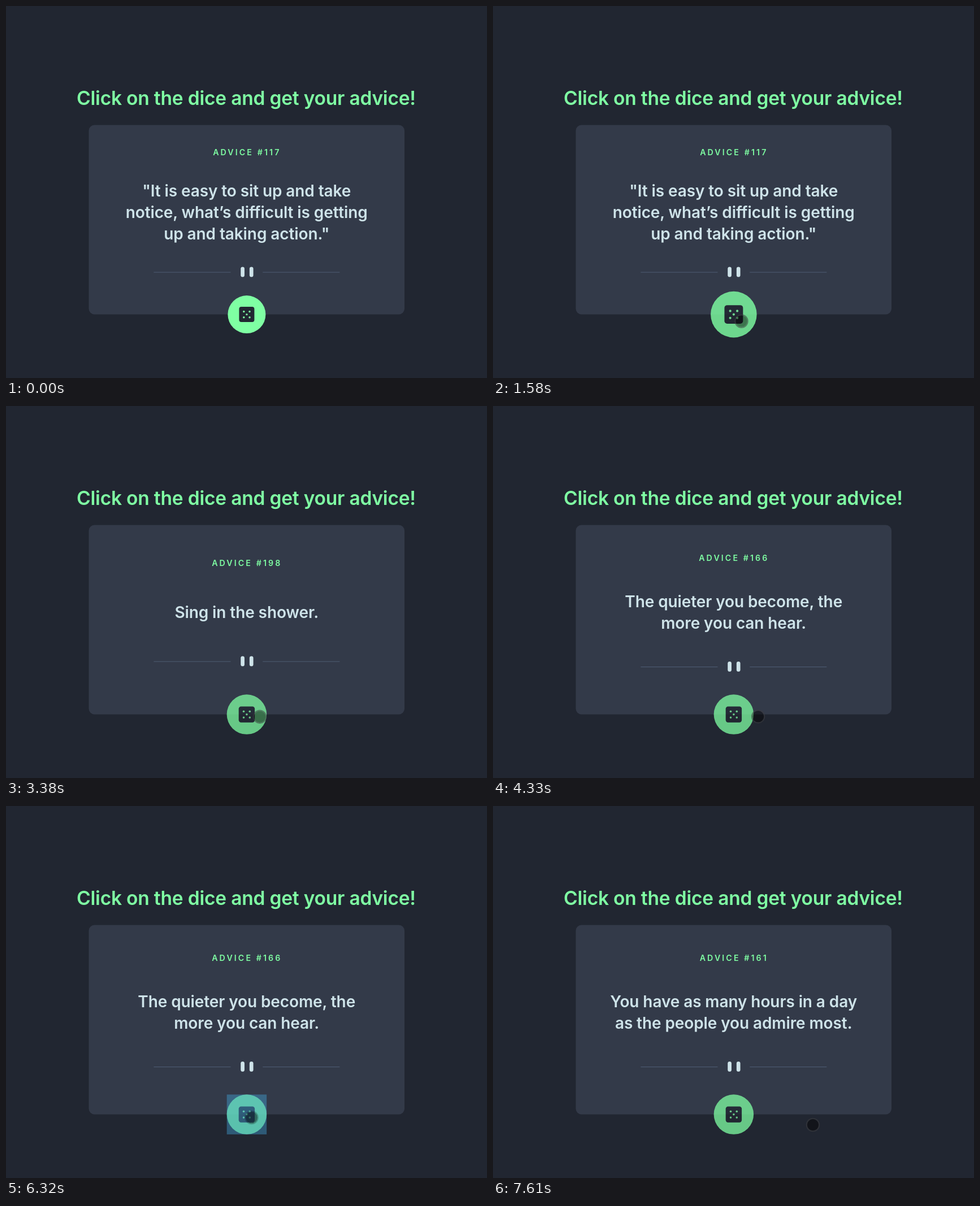
An HTML page for the animation above (7.68 s loop, 851 by 658 pixels).

```html
<!DOCTYPE html>
<html lang="en">
<head>
<meta charset="utf-8">
<title>Advice generator</title>
<style>
  html, body { margin: 0; width: 100%; height: 100%; overflow: hidden; background: #212631; }
  svg { display: block; width: 100vw; height: 100vh; }
  text { font-family: Inter, "Open Sans", sans-serif; text-anchor: middle; }
  .title { font-size: 33.5px; font-weight: 600; letter-spacing: -.2px; fill: #7fffa3; }
  .label { font-size: 14.2px; font-weight: 600; letter-spacing: 3.1px; fill: #7fffa3; }
  .quote { font-size: 28px; font-weight: 600; letter-spacing: -.1px; fill: #cee3e9; }
</style>
</head>
<body>
<svg viewBox="0 0 851 658">
  <rect width="851" height="658" fill="#212631"/>
  <text class="title" x="425" y="175.3">Click on the dice and get your advice!</text>
  <rect x="146.5" y="210.5" width="558.5" height="335" rx="10" fill="#333a49"/>
  <text class="label" id="label" x="426.3"></text>
  <g id="lines"></g>
  <g id="divider">
    <path d="M0 8h122v1H0zM173 8h122v1H173z" fill="#4f5d74"/>
    <rect x="138" width="6" height="16" rx="3" fill="#cee3e9"/>
    <rect x="152" width="6" height="16" rx="3" fill="#cee3e9"/>
  </g>
  <g id="button">
    <g id="face">
      <circle r="33.5" fill="#7fffa3"/>
      <rect x="-13.5" y="-13.5" width="27" height="27" rx="4" fill="#212631"/>
      <g id="pips" fill="#7fffa3"></g>
    </g>
    <rect id="flash" x="-33.5" y="-33.5" width="67" height="67" fill="#45b4ee"/>
  </g>
  <g id="cursor">
    <circle r="10.3" fill="#000" fill-opacity=".45"/>
    <circle id="ring" r="11.2" fill="none" stroke-width="2"/>
  </g>
</svg>
<script>
const LOOP = 7680;
const NS = "http://www.w3.org/2000/svg";
const el = id => document.getElementById(id);

const advice = [
  { at: 0, id: 117, lines: ['"It is easy to sit up and take', "notice, what’s difficult is getting", 'up and taking action."'] },
  { at: 2510, id: 198, lines: ["Sing in the shower."] },
  { at: 4200, id: 166, lines: ["The quieter you become, the", "more you can hear."] },
  { at: 6790, id: 161, lines: ["You have as many hours in a day", "as the people you admire most."] }
];

// Pointer moves: start, end, number of steps, target, optional bend
const moves = [
  { from: 230, to: 990, steps: 12, end: [464, 572.5], bend: [607, 663] },
  { from: 1060, to: 1190, steps: 3, end: [439.5, 557.5] },
  { from: 1730, to: 2130, steps: 7, end: [480, 559] },
  { from: 3040, to: 3380, steps: 6, end: [449, 549.7] },
  { from: 3700, to: 3701, steps: 1, end: [448.5, 548.7] },
  { from: 4060, to: 4530, steps: 8, end: [481.5, 549.5] },
  { from: 5190, to: 5530, steps: 6, end: [434.5, 551] },
  { from: 7010, to: 7610, steps: 9, end: [566, 564] }
];
const ENTRY = [708, 652];
const presses = [[1380, 1580], [3700, 4060], [5790, 6520]];
const flashes = [[1380, 1580], [3840, 4060], [6190, 6520]];

const within = (spans, t) => spans.some(([a, b]) => t >= a && t < b);
const clamp = v => Math.min(1, Math.max(0, v));
const smooth = v => v * v * (3 - 2 * v);

function make(tag, attrs, parent) {
  const node = document.createElementNS(NS, tag);
  for (const key in attrs) node.setAttribute(key, attrs[key]);
  return parent.appendChild(node);
}

for (const [x, y] of [[-1, -1], [1, -1], [0, 0], [-1, 1], [1, 1]])
  make("circle", { cx: x * 5.1, cy: y * 5.1, r: 1.7 }, el("pips"));

function pointer(t) {
  let pos = ENTRY;
  for (const m of moves) {
    if (t < m.from) break;
    const k = Math.floor((t - m.from) / (m.to - m.from) * (m.steps - 1) + 1e-6);
    const u = Math.min(1, (k + 1) / m.steps);
    const start = pos;
    const bend = m.bend || start.map((v, i) => (v + m.end[i]) / 2);
    pos = start.map((v, i) => (1 - u) ** 2 * v + 2 * u * (1 - u) * bend[i] + u * u * m.end[i]);
  }
  return pos;
}

// The first tap swells the button before it settles in its hover size
function buttonScale(t) {
  const grow = smooth(clamp((t - 1380) / 260));
  const settle = smooth(clamp((t - 1640) / 260));
  return 1 + .25 * grow - .198 * settle;
}

let shown;
function showAdvice(a) {
  if (a === shown) return;
  shown = a;
  const n = a.lines.length, shift = (3 - n) * 9.5;
  el("label").textContent = "ADVICE #" + a.id;
  el("label").setAttribute("y", 264.3 + shift);
  el("divider").setAttribute("transform", `translate(261.4 ${461.5 - shift}) scale(1.115)`);
  el("lines").textContent = "";
  a.lines.forEach((line, i) => {
    make("text", { class: "quote", x: 425.7, y: 374.7 + (i - (n - 1) / 2) * 38 }, el("lines")).textContent = line;
  });
}

function draw(t) {
  showAdvice(advice.filter(a => t >= a.at).pop());
  el("button").setAttribute("transform", `translate(425.9 545.6) scale(${buttonScale(t)})`);
  el("face").setAttribute("opacity", 1 - .25 * smooth(clamp((t - 1380) / 300)));
  el("flash").setAttribute("opacity", within(flashes, t) ? .37 : 0);
  const [x, y] = pointer(t);
  el("cursor").setAttribute("transform", `translate(${x} ${y})`);
  el("cursor").setAttribute("visibility", t < 230 ? "hidden" : "visible");
  el("ring").setAttribute("stroke", within(presses, t) ? "rgba(0,0,0,.22)" : "rgba(60,60,64,.55)");
}

const begin = performance.now();
function tick() {
  draw((performance.now() - begin) % LOOP);
  requestAnimationFrame(tick);
}
tick();
</script>
</body>
</html>
```
